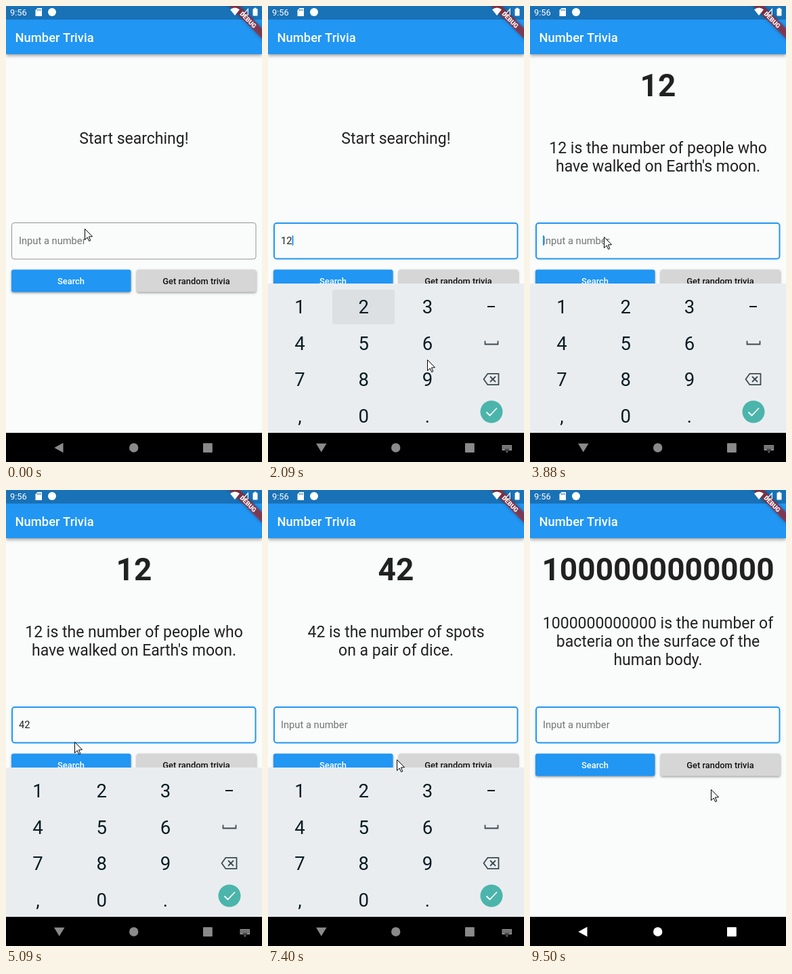
An HTML page with a canvas that plays this animation: 378 by 672 pixels, repeating every 9620 ms.

```html
<!DOCTYPE html>
<html lang="en">
<head>
<meta charset="utf-8">
<title>Number Trivia</title>
<style>
html, body { margin: 0; width: 100%; height: 100%; overflow: hidden; background: #fafafa; }
canvas { display: block; width: 378px; height: 672px; }
</style>
</head>
<body>
<canvas id="stage" width="378" height="672"></canvas>
<script>
const ctx = document.getElementById('stage').getContext('2d');
const W = 378, H = 672, LOOP = 9620, STEP = 110.5;
const BLUE = '#2196f3', INK = '#212121', NAV_TOP = 629, KEYS_TOP = 409;

const clamp = v => Math.max(0, Math.min(1, v));
const ramp = (t, from, length) => clamp((t - from) / length);
const mix = (a, b, p) => a + (b - a) * p;
const rgb = (a, b, p) => `rgb(${a.map((v, i) => Math.round(mix(v, b[i], p)))})`;
const latest = (list, t) => list.filter(e => e[0] <= t).pop();

// Pointer path: time, x, y
const POINTER = [
  [0, 116, 328], [100, 116, 325], [420, 116, 325], [660, 114, 313], [1100, 72, 395],
  [1436, 56, 428], [1580, 56, 431], [1880, 138, 431], [1990, 139, 431], [2205, 328, 608],
  [2500, 328, 608], [2600, 330, 608], [2880, 330, 608], [3425, 113, 346], [3600, 113, 346],
  [3860, 109, 340], [4780, 109, 340], [5450, 92, 408], [5740, 88, 397], [6660, 88, 397],
  [7620, 220, 397], [8300, 220, 397], [8398, 157, 512], [8900, 79, 648], [9280, 80, 653],
  [9503, 267, 441], [LOOP, 267, 441]
];
const TYPED = [[0, ''], [1547, '1'], [1985, '12'], [2790, ''], [4310, '4'], [4420, '42'], [5840, '']];
const BLINKS = [[440], [1547], [1985], [3580], [4310], [4420], [5840]];
const VIEWS = [[0, 'start'], [2808, 'load'], [3200, 'twelve'], [5837, 'load'],
  [6180, 'dice'], [7840, 'load'], [8100, 'body']];
const FACTS = {
  twelve: ['12', '12 is the number of people who', "have walked on Earth's moon."],
  dice: ['42', '42 is the number of spots', 'on a pair of dice.'],
  body: ['1000000000000', '1000000000000 is the number of', 'bacteria on the surface of the', 'human body.']
};

function text(str, x, y, size, color, weight = 400, align = 'center') {
  ctx.font = `${weight} ${size}px Roboto, sans-serif`;
  ctx.textAlign = align;
  ctx.fillStyle = color;
  ctx.fillText(str, x, y);
}
function rect(x, y, w, h, color) {
  ctx.fillStyle = color;
  ctx.fillRect(x, y, w, h);
}
function round(x, y, w, h, r, color) {
  ctx.beginPath();
  ctx.roundRect(x, y, w, h, r);
  ctx.fillStyle = color;
  ctx.fill();
}
function disc(x, y, r, color) {
  ctx.beginPath();
  ctx.arc(x, y, r, 0, 7);
  ctx.fillStyle = color;
  ctx.fill();
}
function path(points, closed) {
  ctx.beginPath();
  points.forEach(p => ctx.lineTo(p[0], p[1]));
  if (closed) ctx.closePath();
}
function poly(points, color) {
  path(points, true);
  ctx.fillStyle = color;
  ctx.fill();
}
function line(points, color, width, closed) {
  path(points, closed);
  ctx.strokeStyle = color;
  ctx.lineWidth = width;
  ctx.stroke();
}
function shadow(color, blur, dy) {
  ctx.shadowColor = color;
  ctx.shadowBlur = blur;
  ctx.shadowOffsetY = dy;
}

// Cubic ease (0.4, 0, 0.2, 1)
function ease(x) {
  let lo = 0, hi = 1;
  for (let i = 0; i < 20; i++) {
    const u = (lo + hi) / 2, v = 1 - u;
    if (1.2 * u * v * v + 0.6 * u * u * v + u * u * u < x) lo = u; else hi = u;
  }
  return 3 * lo * lo * (1 - lo) + lo * lo * lo;
}

function spinner(age) {
  const p = age / 1000 % 1;
  const head = ease(clamp(p * 2)) * 1.5 * Math.PI;
  const tail = ease(clamp(p * 2 - 1)) * 1.5 * Math.PI;
  const start = -Math.PI / 2 + tail + p * 1.7 * Math.PI;
  ctx.beginPath();
  ctx.arc(189, 195, 16.2, start, start + Math.max(head - tail, 0.01));
  ctx.strokeStyle = BLUE;
  ctx.lineWidth = 3.7;
  ctx.stroke();
}

function content(t) {
  const [since, view] = latest(VIEWS, t);
  if (view === 'start') return text('Start searching!', 189, 203, 23, INK);
  if (view === 'load') return spinner(t - since);
  const [title, ...lines] = FACTS[view];
  text(title, 189, 133, 46, INK, 700);
  lines.forEach((s, i) => text(s, 189, 230.5 + (i - (lines.length - 1) / 2) * 27, 23, INK));
}

function field(t) {
  const focused = (t >= 440 && t < 2790) || t >= 3580;
  const focus = t < 2790 ? ramp(t, 440, 150)
    : t < 3580 ? 1 - ramp(t, 2790, 170) : ramp(t, 3580, 150);
  const width = mix(1, 2, focus);
  ctx.beginPath();
  ctx.roundRect(8 + width / 2, 319 + width / 2, 361.5 - width, 54.5 - width, 3.7);
  ctx.strokeStyle = rgb([146, 147, 147], [33, 150, 243], focus);
  ctx.lineWidth = width;
  ctx.stroke();

  const [since, value] = latest(TYPED, t);
  if (value) {
    text(value, 19, 350.5, 14.7, INK, 400, 'left');
  } else {
    ctx.globalAlpha = since ? ramp(t, since, 125) : 1;
    text('Input a number', 19, 350.5, 14.7, '#737474', 400, 'left');
    ctx.globalAlpha = 1;
  }
  if (!focused) return;
  const blink = latest(BLINKS, t)[0];
  if (Math.floor((t - blink) / 500) % 2) return;
  ctx.font = '400 14.7px Roboto, sans-serif';
  round(19 + ctx.measureText(value).width, 338, 2, 15, 1, BLUE);
}

function button(x, label, fill, ink, glow) {
  shadow('rgba(0,0,0,.38)', 3.5, 1.5);
  round(x, 388.5, 176.5, 33, 3, fill);
  shadow('transparent', 0, 0);
  round(x, 388.5, 176.5, 33, 3, glow);
  text(label, x + 88, 409.7, 12.87, ink, 500);
}

function pressGlow(t, from, hold, to) {
  return ramp(t, from, 60) * (1 - ramp(t, hold, to - hold));
}

function appBar() {
  shadow('rgba(0,0,0,.4)', 5, 2);
  rect(0, 0, W, 71, BLUE);
  shadow('transparent', 0, 0);
  text('Number Trivia', 13.5, 52.5, 18.4, '#fff', 500, 'left');
}

function statusBar() {
  rect(0, 0, W, 20, 'rgba(0,0,0,.25)');
  ctx.save();
  ctx.translate(W, 0);
  ctx.rotate(Math.PI / 4);
  shadow('rgba(0,0,0,.45)', 5, 0);
  rect(-40, 23.2, 80, 11, 'rgba(183,28,28,.63)');
  shadow('transparent', 0, 0);
  text('DEBUG', 0, 32.2, 9.4, '#fff', 900);
  ctx.restore();

  text('9:56', 6, 14, 12.9, '#fff', 400, 'left');
  poly([[46.5, 3], [53, 3], [53, 15], [43.5, 15], [43.5, 6.2]], '#fff');
  [46.3, 48.6, 50.9].forEach(x => rect(x - 0.5, 4.6, 1.1, 2.6, '#1b72b7'));
  disc(68, 9, 6, '#fff');

  ctx.beginPath();
  ctx.moveTo(338, 14);
  ctx.lineTo(331, 5.3);
  ctx.quadraticCurveTo(338, -0.2, 345, 5.3);
  ctx.closePath();
  ctx.fillStyle = '#fff';
  ctx.fill();
  line([[357.3, 4.5], [357.3, 13], [349.8, 13]], '#fff', 1.2, true);
  round(364.5, 4, 7, 10.5, 0.8, '#fff');
  rect(366.5, 2.7, 3, 1.5, '#fff');
}

// Visibility of the number pad and whether it is on its way out
function padState(t) {
  if (t < 500) return { p: 0 };
  if (t < 2700) return { p: ramp(t, 500, 215), open: true };
  if (t < 3640) return { p: 1 - ramp(t, 2700, 205) };
  if (t < 9060) return { p: ramp(t, 3640, 215), open: true };
  return { p: 1 - ramp(t, 9060, 205) };
}

function pad(t, { p, open }) {
  if (p <= 0) return;
  ctx.save();
  if (open) {
    ctx.beginPath();
    ctx.rect(0, 0, W, NAV_TOP);
    ctx.clip();
  }
  ctx.globalAlpha = p;
  ctx.translate(0, 52 * (1 - p));
  const dark = '#071c23', soft = '#3b4a51';
  rect(0, KEYS_TOP, W, NAV_TOP - KEYS_TOP, '#eaedf0');

  const hit = (x, from) => {
    const g = pressGlow(t, from, from + 110, from + 260);
    if (g > 0) round(x, 418, 92, 51, 3, `rgba(0,0,0,${0.09 * g})`);
  };
  hit(1, 1500);
  hit(95, 1930);

  ['123', '456', '789', ',0.'].forEach((row, r) =>
    [...row].forEach((key, c) => text(key, 47 + c * 94.2, 453 + r * 53.5, 27.5, dark)));

  rect(324, 442, 11, 2, dark);
  line([[320.5, 493.5], [320.5, 498.5], [339.5, 498.5], [339.5, 493.5]], soft, 1.8);
  ctx.lineJoin = 'round';
  line([[318.5, 550], [324.5, 541.8], [340.5, 541.8], [340.5, 558.2], [324.5, 558.2]], soft, 1.8, true);
  line([[328, 546], [336, 554]], soft, 1.8);
  line([[336, 546], [328, 554]], soft, 1.8);
  ctx.lineJoin = 'miter';

  disc(330, 598, 16.5, '#4bb5ab');
  const g = pressGlow(t, 2500, 2640, 2760);
  if (g > 0) disc(330, 598, 16.5, `rgba(0,0,0,${0.14 * g})`);
  line([[322.5, 598.5], [327.5, 603.5], [338, 592.5]], '#fff', 1.8);
  ctx.restore();
}

function navIcons(t, { open }) {
  const white = t >= 9060 ? ramp(t, 9060, 380)
    : t >= 2700 && t < 3640 ? ramp(t, 2700, 380) : 0;
  const color = rgb([138, 138, 138], [255, 255, 255], white);
  if (open) {
    poly([[71, 644.8], [86.5, 644.8], [78.7, 657.5]], color);
    rect(345.5, 647, 14.5, 8, color);
    for (let r = 0; r < 2; r++)
      for (let c = 0; c < 5; c++) rect(347.2 + c * 2.5, 648.7 + r * 2.4, 1, 1, '#000');
    rect(349.5, 653.2, 6.5, 0.9, '#000');
    poly([[350.5, 656.3], [355, 656.3], [352.7, 658.6]], color);
  } else {
    poly([[71.3, 651], [84.5, 643.8], [84.5, 658.2]], color);
  }
  disc(188.7, 651, 6.7, color);
  round(291, 644.3, 13.8, 13.8, 0.8, color);
}

function pointer(t) {
  const i = Math.max(1, POINTER.findIndex(k => k[0] >= t));
  const a = POINTER[i - 1], b = POINTER[i];
  const p = ramp(t, a[0], b[0] - a[0]);
  ctx.save();
  ctx.translate(Math.round(mix(a[1], b[1], p)) + 0.5, Math.round(mix(a[2], b[2], p)) + 0.5);
  const arrow = [[0, 0], [0, 16], [3.7, 12.5], [6.2, 18], [8.3, 17], [5.9, 11.5], [11, 11.2]];
  poly(arrow, '#fff');
  line(arrow, '#000', 1, true);
  ctx.restore();
}

function draw(t) {
  const keys = padState(t);
  rect(0, 0, W, H, '#fafbfb');
  appBar();
  content(t);
  field(t);
  const search = 0.24 * pressGlow(t, 5820, 6000, 6180);
  const random = 0.13 * pressGlow(t, 7700, 7960, 8160);
  button(8, 'Search', BLUE, '#fff', `rgba(255,255,255,${search})`);
  button(193, 'Get random trivia', '#d6d6d6', '#111', `rgba(0,0,0,${random})`);
  statusBar();
  rect(0, NAV_TOP, W, H - NAV_TOP, '#000');
  pad(t, keys);
  navIcons(t, keys);
  pointer(t);
}

const begin = performance.now();
function tick() {
  const t = Math.max(0, performance.now() - begin) % LOOP;
  draw(Math.floor((t + 27) / STEP) * STEP);
  requestAnimationFrame(tick);
}
tick();
</script>
</body>
</html>
```
